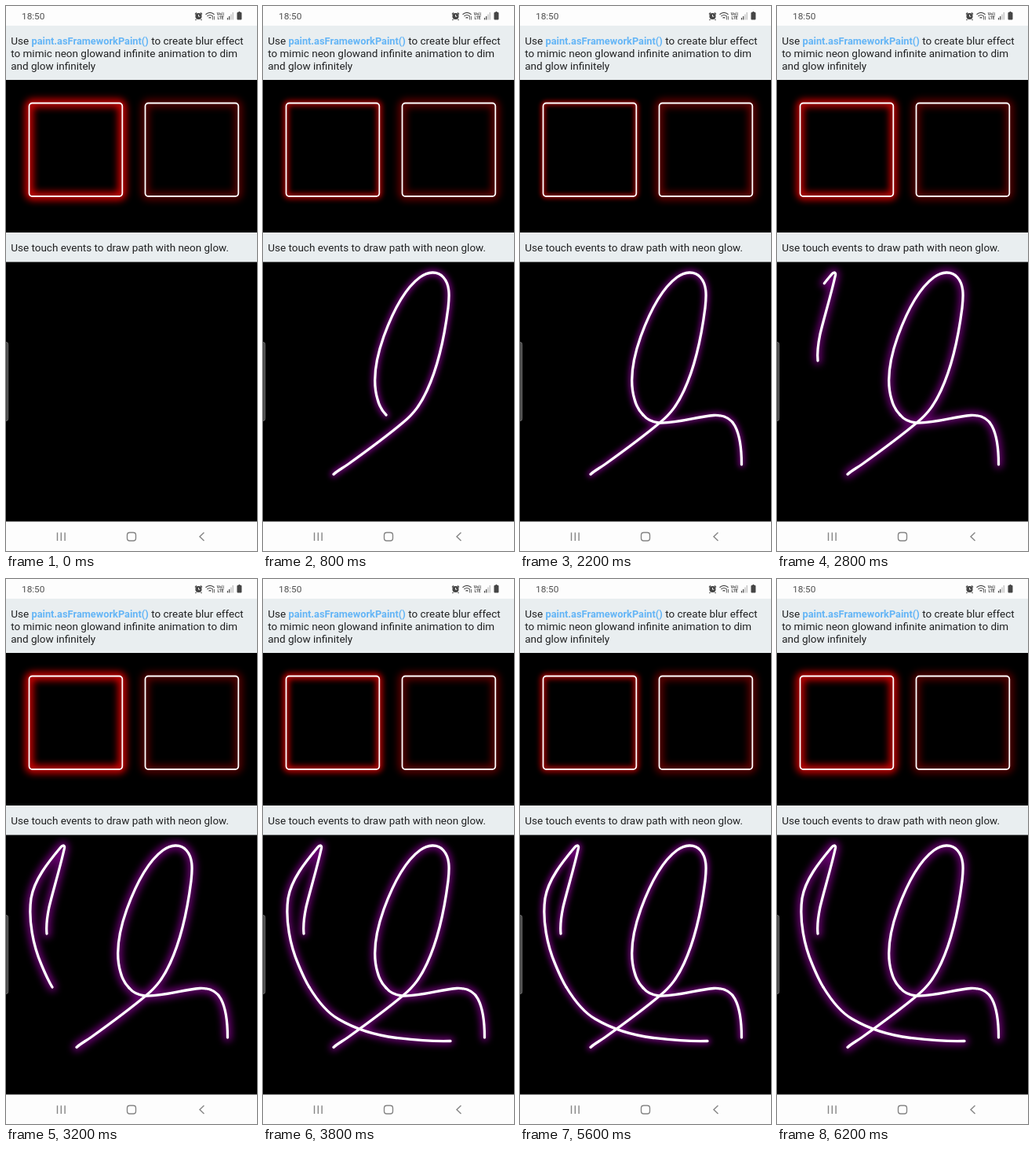
Write an HTML page that moves like this. It is 320 px wide and 693 px high and loops after 6400 ms.

```html
<!DOCTYPE html>
<html lang="en">
<head>
<meta charset="utf-8">
<title>Neon glow</title>
<style>
  html, body { margin: 0; width: 100%; height: 100%; overflow: hidden; background: #000; }
  svg { display: block; width: 100vw; height: 100vh; font-family: Roboto, sans-serif; }
  .body { font-size: 13.5px; fill: #202122; }
  .code { font-size: 12.8px; font-weight: 700; fill: #64b5f6; }
  .line { fill: none; stroke: #fff; stroke-linecap: round; stroke-linejoin: round; }
  .box { stroke-width: 1.8; }
  .pen { stroke-width: 3.3; }
  .glow { fill: none; stroke-linecap: round; stroke-linejoin: round; }
  .red { stroke: #f00; }
  .purple { stroke: #c800d8; }
  .icon { fill: none; stroke: #454545; stroke-width: 1.2; }
  .nav { fill: none; stroke: #858585; stroke-width: 1.4; }
</style>
</head>
<body>
<svg viewBox="0 0 320 693" preserveAspectRatio="none">
  <defs>
    <rect id="boxA" x="29.5" y="123.5" width="118.800" height="118.500" rx="4"/>
    <rect id="boxB" x="177.500" y="123.500" width="118.800" height="118.500" rx="4"/>
    <g id="strokes">
      <path d="M90 595.5C96 590 101 588 108 583C136 563 159 546 178 530C193 518 201 506 209 489C223 459 231 423 236 384C238 367 238 354 230 345C222 336 210 338 200 345C181 359 165 390 154 420C144 448 139 477 146 500C148 508 151 514 157 520"/>
      <path d="M157 520C162 526 168 529 177 530C202 531 225 522 247 520.5C259 520 268 523 274 534C281 547 282.5 564 282.5 583"/>
      <path d="M52 451C51 441 52.500 429 55 417C60 396 68.500 369 74.500 342C75 338 72 338 69 342C54 360 36 382 32 406C28 434 35 467 45 490C50 502 54 511 59 519"/>
      <path d="M59 519C70 537 81 551 96 559.500C119 573 142 580 170 583.500C192 586 213 588.500 239 587.500"/>
    </g>
  </defs>

  <rect width="320" height="693"/>
  <use id="glowA" class="glow red" href="#boxA"/>
  <use id="glowB" class="glow red" href="#boxB"/>
  <use class="line box" href="#boxA"/>
  <use class="line box" href="#boxB"/>
  <use id="glowPen" class="glow purple" href="#strokes"/>
  <use class="line pen" href="#strokes"/>

  <rect width="320" height="25" fill="#fdfdfd"/>
  <rect y="25" width="320" height="69" fill="#e9eef0"/>
  <rect y="288" width="320" height="37.500" fill="#e9eef0"/>
  <rect y="655.500" width="320" height="37.500" fill="#fdfdfd"/>

  <g class="body">
    <text x="6.2" y="49">Use <tspan class="code">paint.asFrameworkPaint()</tspan> to create blur effect</text>
    <text x="6.2" y="65">to mimic neon glowand infinite animation to dim</text>
    <text x="6.2" y="80.7">and glow infinitely</text>
    <text x="6.2" y="312">Use touch events to draw path with neon glow.</text>
  </g>

  <text x="20" y="17" font-size="11.8" fill="#505050">18:50</text>
  <g class="icon">
    <circle cx="245.5" cy="13" r="3.5" fill="#454545"/>
    <path d="M241 10.5l2-2M250 10.5l-2-2M242.5 17l-1 1M248.5 17l1 1"/>
    <path d="M245.5 11v2.3h1.800" stroke="#fff" stroke-width=".9"/>
    <path d="M254.5 10.8Q260 5.8 265.5 10.8M256.5 13Q260 10 263.5 13M258.5 15.2Q260 14 261.5 15.2"/>
    <path d="M263.5 13v4.5M265.5 17.5v-4.5" stroke-width=".8"/>
    <path d="M282.5 17.5v-2.5M284.7 17.5v-4.5"/>
    <path d="M287 17.5v-7M289.3 17.5v-9.5" stroke="#bbb"/>
  </g>
  <g fill="#454545" font-size="5" font-weight="700" text-anchor="middle">
    <text x="273.5" y="12">Vo))</text>
    <text x="273.5" y="17.3">LTE</text>
  </g>
  <path d="M295.5 8h1v-1h2v1h1q1 0 1 1v7.5q0 1-1 1h-4q-1 0-1-1v-7.5q0-1 1-1z" fill="#454545"/>

  <g class="nav">
    <path d="M65.500 669.500v10.500M70.300 669.500v10.500M75.100 669.500v10.500"/>
    <rect x="154.500" y="669.500" width="11" height="10.500" rx="3.200"/>
    <path d="M252.500 669.500l-5.500 5.300 5.500 5.300"/>
  </g>
  <path d="M-1 427.500h1.500q2.200 0 2.200 3v94q0 3-2.200 3h-1.500z" fill="#4a4a4a" stroke="#777" stroke-width=".8"/>
</svg>
<script>
  const LOOP = 6400, STEP = 200, PULSE = 3200;
  const el = id => document.getElementById(id);

  // start and end time of each drawn piece
  const spans = [[100, 800], [800, 1400], [2500, 3200], [3200, 3600]];
  const pens = [...document.querySelectorAll('#strokes path')].map((path, i) => {
    const [from, to] = spans[i];
    return { path, from, to, len: path.getTotalLength() };
  });

  function glow(id, width, blur, alpha) {
    const s = el(id).style;
    s.strokeWidth = width;
    s.filter = `blur(${blur}px)`;
    s.opacity = alpha;
  }

  function draw(t) {
    const v = 0.5 + 0.5 * Math.cos(2 * Math.PI * t / PULSE);
    glow('glowA', 5 + 5 * v, 2 + 2.8 * v, 0.4 + 0.45 * v);
    glow('glowB', 10, 5, 0.43 - 0.09 * v);
    glow('glowPen', 7 + 4 * v, 2.8 + 2.2 * v, 0.52);
    for (const { path, from, to, len } of pens) {
      const k = Math.min(1, Math.max(0, (t - from) / (to - from)));
      path.style.display = k > 0 ? '' : 'none';
      path.style.strokeDasharray = k < 1 ? `${len * k} ${len * 2}` : 'none';
    }
  }

  const start = performance.now();
  function tick() {
    const t = (performance.now() - start) % LOOP;
    draw(Math.floor(t / STEP) * STEP);
    requestAnimationFrame(tick);
  }
  tick();
</script>
</body>
</html>
```
